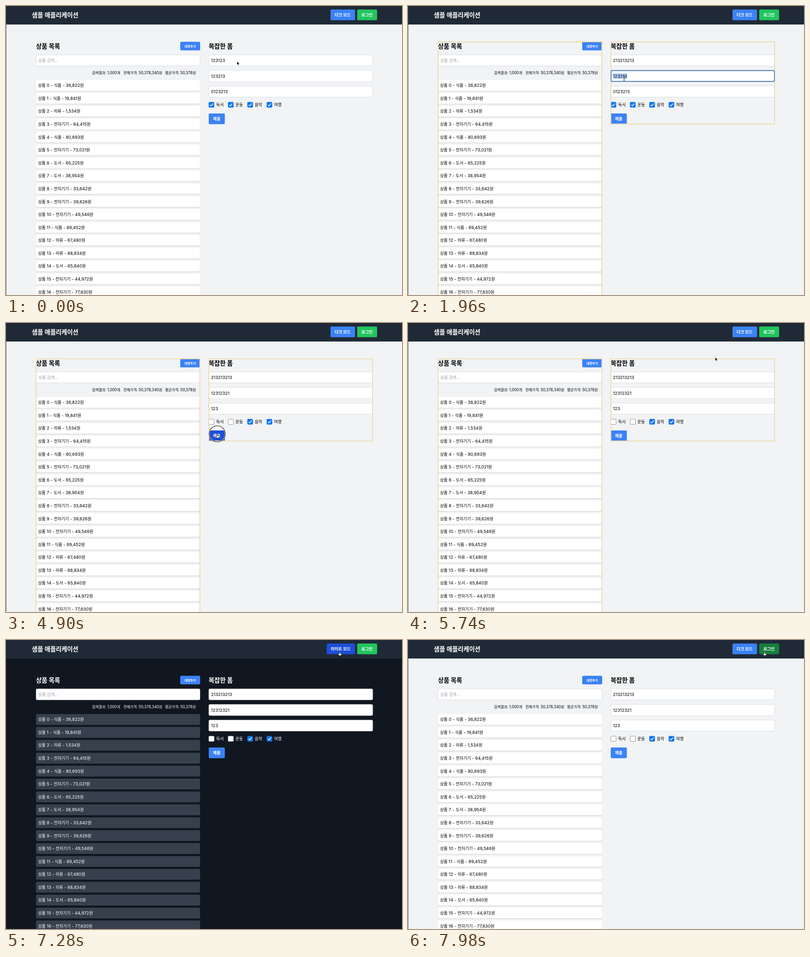
These frames come from a looping animation (875x640 px, 8000 ms). An HTML page:

```html
<!DOCTYPE html>
<html lang="ko">
<head>
<meta charset="utf-8">
<title>샘플 애플리케이션</title>
<style>
html, body { margin: 0; width: 100%; height: 100%; overflow: hidden; background: #f1f3f5; }
svg {
  display: block; width: 875px; height: 640px;
  font: 400 9.52px Inter, "Noto Sans CJK KR", "Noto Sans CJK", sans-serif;
  --bg: #f1f3f5; --ink: #000; --row: #fff; --shade: .13; --edge: #333b45; --line: #d3d7dc;
}
svg.dark { --bg: #101721; --ink: #fff; --row: #37414e; --shade: 0; --edge: #29323d; --line: #e6e8ea; }
text { fill: var(--ink); white-space: pre; }
.ko { font-family: "Noto Sans CJK KR", "Noto Sans CJK", sans-serif; font-size: .96em; letter-spacing: -.013em; font-weight: inherit; }
.b { font-weight: 700; }
.w { fill: #fff; }
.k { fill: #000; }
.hint { fill: #9aa0a8; }
.row { fill: var(--row); }
.field { fill: #fff; stroke: var(--line); stroke-width: .8; }
.ring { fill: none; stroke: #1f5aa8; stroke-width: 1.4; }
</style>
</head>
<body>
<svg id="stage" viewBox="0 0 875 640"></svg>
<script>
const NS = "http://www.w3.org/2000/svg";
const stage = document.getElementById("stage");

function add(tag, attrs, parent = stage) {
  const el = document.createElementNS(NS, tag);
  for (const k in attrs) el.setAttribute(k, attrs[k]);
  return parent.appendChild(el);
}
function rect(x, y, width, height, attrs = {}, parent) {
  return add("rect", { x, y, width, height, ...attrs }, parent);
}
// Hangul runs are set in their own face, slightly tighter than the Latin text.
function setText(el, str) {
  if (el.dataset.str === str) return;
  el.dataset.str = str;
  el.textContent = "";
  for (const run of str.split(/([가-힣]+)/)) {
    if (!run) continue;
    if (/[가-힣]/.test(run)) add("tspan", { class: "ko" }, el).textContent = run;
    else el.append(run);
  }
}
function text(x, y, str, cls = "", size = 9.52, parent) {
  const el = add("text", { x, y, class: cls, style: `font-size:${size}px` }, parent);
  setText(el, str);
  return el;
}
function button(x, y, w, h, label, tx, ty, fill, size) {
  const box = rect(x, y, w, h, { rx: 2.4, fill });
  return { box, label: text(tx, ty, label, "b w", size) };
}
const show = (el, on) => el.setAttribute("visibility", on ? "visible" : "hidden");
const fill = (el, c) => el.setAttribute("fill", c);

const BLUE = "#3b82f6", BLUE_HOVER = "#1d4ed8", GREEN = "#22c55e", GREEN_HOVER = "#15803d";

// Page and header
rect(0, 0, 875, 640, { style: "fill:var(--bg)" });
rect(0, 0, 875, 41, { fill: "#202a37" });
rect(0, 0, .7, 640, { style: "fill:var(--edge)" });
text(57, 24.6, "샘플 애플리케이션", "b w", 14.28);
const mode = button(717, 7.8, 54.3, 23.8, "다크 모드", 726, 23, BLUE);
const login = button(776, 7.8, 44, 23.8, "로그인", 785.3, 23, GREEN);

// Product list
text(66.3, 94, "상품 목록", "b", 14.28);
button(385, 79.3, 44, 19, "대량추가", 394.5, 91.5, BLUE, 7.2);
rect(66.6, 108.2, 362, 24.4, { rx: 2.4, class: "field" });
text(71.3, 123.8, "상품 검색...", "hint");
text(190, 151.3, "검색결과: 1,000개", "", 8.33);
text(259.5, 151.3, "전체가격: 50,378,340원", "", 8.33);
text(351.5, 151.3, "평균가격: 50,378원", "", 8.33);
const kinds = ["식품", "의류", "전자기기", "도서"];
const items = [
  [0, 36822], [0, 19841], [1, 1534], [2, 64415], [0, 80693], [2, 73021], [3, 65225], [3, 38954], [2, 33642],
  [2, 39626], [2, 49546], [0, 89452], [1, 67480], [1, 88834], [3, 65840], [2, 44972], [2, 77630]
];
items.forEach(([kind, price], i) => {
  const y = 164 + i * 28.58;
  rect(66, y + .2, 363, 24.9, { rx: 2.6, style: "fill:#000;opacity:var(--shade)" });
  rect(66.3, y, 362.5, 23.9, { rx: 2.4, class: "row" });
  text(70.8, y + 15.3, `상품 ${i} - ${kinds[kind]} - ${price.toLocaleString("en-US")}원`);
});

// Form
text(447.8, 94, "복잡한 폼", "b", 14.28);
const fields = [0, 1, 2].map(i => {
  const y = 108.2 + i * 34.55;
  rect(448.2, y, 362, 24.4, { rx: 2.4, class: "field" });
  const mark = rect(453, y + 6.2, 0, 12, { fill: "#b0d3fb" });
  return { y, mark, input: text(453, y + 15.8, "", "k") };
});
const checks = ["독서", "운동", "음악", "여행"].map((label, i) => {
  const x = 448.2 + i * 42.7;
  const box = rect(x, 212.9, 11.6, 11.6, { rx: 1.6, "stroke-width": .8 });
  const tick = add("path", {
    d: `M${x + 2.6} 219l2.3 2.4 4.3-5.4`, fill: "none", stroke: "#fff", "stroke-width": 1.6
  });
  text(x + 16, 222.1, label);
  return { box, tick };
});
const submit = button(448, 237.9, 35.5, 23.8, "제출", 457.3, 253.2, BLUE);

// Render highlights around both columns
const glow = add("g", { fill: "none" });
const glowLines = [[66.4, 79.3, 362, 640], [448.3, 79.3, 361.6, 182]].map(b => {
  rect(...b, { stroke: "#f0f0f0", "stroke-width": 1.8 }, glow);
  return rect(...b, { "stroke-width": .9, "stroke-opacity": .85 }, glow);
});
const HEAT = ["#37afa9", "#63b19e", "#80b393", "#97b488", "#abb67d", "#beb771", "#cfb965", "#dfba57", "#efbb49", "#f3bf55"];

const focus = rect(448.8, 0, 360.8, 24, { rx: 2, class: "ring" });
const caret = rect(0, 0, .7, 11, { fill: "#000" });
const spin = add("g");
rect(796, 182.6, 9, 14, { rx: 2, fill: "#efefef" }, spin);
add("path", { d: "M798.6 187.4l1.9-2.4 1.9 2.4zM798.6 191.8l1.9 2.4 1.9-2.4z", fill: "#444" }, spin);

// Pointer
const press = add("g", { fill: "none" });
add("circle", { r: 17.8, stroke: "#fff", "stroke-width": 2.4 }, press);
add("circle", { r: 17.8, stroke: "#000", "stroke-width": 1.1 }, press);
const pointer = add("g");
const shapes = {
  arrow: add("path", {
    d: "M0 0V8.2L1.9 6.5 3.1 9.3 4.5 8.7 3.3 6H5.8Z", fill: "#000", stroke: "#fff", "stroke-width": .7
  }, pointer),
  beam: add("path", {
    d: "M-2-5Q0-5 0-3.6 0-5 2-5M0-3.6V3.6M-2 5Q0 5 0 3.6 0 5 2 5M-1 1H1",
    fill: "none", stroke: "#111", "stroke-width": .9
  }, pointer),
  hand: add("path", {
    d: "M-1 .8a1 1 0 0 1 2 0V3.8L3.8 4.6Q4.7 5 4.4 6L3.6 9H-1L-3.4 6Q-3.7 4.9-2.5 5L-1 6Z",
    fill: "#fff", stroke: "#000", "stroke-width": .8
  }, pointer)
};

// time, x, y, shape from here on (empty: hidden)
const path = [
  [0, 510.5, 122.5, "arrow"], [70, 506, 123, "beam"], [420, 480, 122, ""],
  [1540, 476, 147, "beam"], [1610, 475, 157, "beam"], [1750, 477.5, 160, "beam"], [2170, 477.5, 160, ""],
  [2870, 478, 164, "beam"], [3010, 480, 190, "beam"], [3430, 480, 190, ""],
  [3640, 484, 192, "beam"], [3780, 496, 214, "arrow"], [3850, 496.8, 219.2, "arrow"], [4130, 496.8, 219.2, "arrow"],
  [4200, 453, 224, "arrow"], [4410, 453, 224, "arrow"], [4620, 453, 226, "arrow"], [4690, 461, 242, "hand"],
  [4830, 466.7, 245.5, "hand"], [5250, 466.7, 245.5, "hand"], [5390, 480, 228, "arrow"],
  [5880, 728, 38, "arrow"], [6020, 736, 27, "hand"], [6230, 737, 25.6, "hand"],
  [7490, 737, 25.6, "hand"], [7980, 787.5, 25.4, "hand"]
];
const presses = [[3990, 4130], [4410, 4550], [4900, 5040], [6510, 6650], [7140, 7280]];
const between = (t, a, b) => t >= a && t < b;

function pointerAt(t) {
  let i = path.length - 1;
  while (path[i][0] > t) i--;
  const a = path[i], b = path[i + 1] || a;
  let u = b === a ? 0 : (t - a[0]) / (b[0] - a[0]);
  u = u * u * (3 - 2 * u);
  return { x: a[1] + (b[1] - a[1]) * u, y: a[2] + (b[2] - a[2]) * u, shape: a[3] };
}
const KEY = 70;
const keys = (t, start, max) => t < start ? 0 : Math.min(max, Math.floor((t - start) / KEY) + 1);

function draw(t) {
  t = Math.floor(t / KEY) * KEY;
  const dark = between(t, 6720, 7420);
  stage.setAttribute("class", dark ? "dark" : "");

  // Typing
  const n = [
    keys(t, 910, 9),
    keys(t, 2170, 3) + keys(t, 2520, 5),
    keys(t, 3430, 3)
  ];
  const before = ["123123", "123213", "0123213"], after = ["213213213", "12312321", "123"];
  const marked = [between(t, 280, 910), between(t, 1890, 2170), between(t, 3080, 3430)];
  const active = between(t, 210, 1610) ? 0 : between(t, 1610, 3010) ? 1 : between(t, 3010, 3990) ? 2 : -1;
  fields.forEach((f, i) => {
    setText(f.input, n[i] ? after[i].slice(0, n[i]) : before[i]);
    f.mark.setAttribute("width", marked[i] ? f.input.getComputedTextLength() : 0);
  });
  show(focus, active >= 0);
  show(caret, active >= 0 && !marked[active]);
  show(spin, active === 2);
  if (active >= 0) {
    const f = fields[active];
    focus.setAttribute("y", f.y + .2);
    caret.setAttribute("x", 453.2 + f.input.getComputedTextLength());
    caret.setAttribute("y", f.y + 6.6);
  }

  // Highlights warm up with every re-render
  const count = n[0] + n[1] + n[2];
  show(glow, between(t, 910, 7000));
  for (const g of glowLines) g.setAttribute("stroke", HEAT[Math.max(0, Math.min(count, 10) - 1)]);

  // Pointer and hover
  const p = pointerAt(t);
  const over = (x, y, w, h) => p.shape && p.x >= x && p.x <= x + w && p.y >= y && p.y <= y + h;
  pointer.setAttribute("transform", `translate(${p.x} ${p.y})`);
  for (const k in shapes) show(shapes[k], k === p.shape);
  press.setAttribute("transform", `translate(${p.x} ${p.y})`);
  show(press, presses.some(([a, b]) => between(t, a, b)));

  checks.forEach((c, i) => {
    const on = i > 1 || t < (i ? 4130 : 4550);
    const hot = over(448.2 + i * 42.7, 212.9, 11.6, 11.6);
    const tone = hot ? "#0b58bd" : "#0d74ee";
    fill(c.box, on ? tone : "#fff");
    c.box.setAttribute("stroke", on ? tone : dark ? "#d5d8dc" : "#767676");
    show(c.tick, on);
  });

  const left = dark ? 708.6 : 717;
  mode.box.setAttribute("x", left);
  mode.box.setAttribute("width", 771.3 - left);
  mode.label.setAttribute("x", left + 9);
  setText(mode.label, dark ? "라이트 모드" : "다크 모드");
  fill(mode.box, over(left, 7.8, 771.3 - left, 23.8) ? BLUE_HOVER : BLUE);
  fill(login.box, over(776, 7.8, 44, 23.8) ? GREEN_HOVER : GREEN);
  fill(submit.box, over(448, 237.9, 35.5, 23.8) ? BLUE_HOVER : BLUE);
}

const start = performance.now();
function tick() {
  draw((performance.now() - start) % 8000);
  requestAnimationFrame(tick);
}
tick();
</script>
</body>
</html>
```
